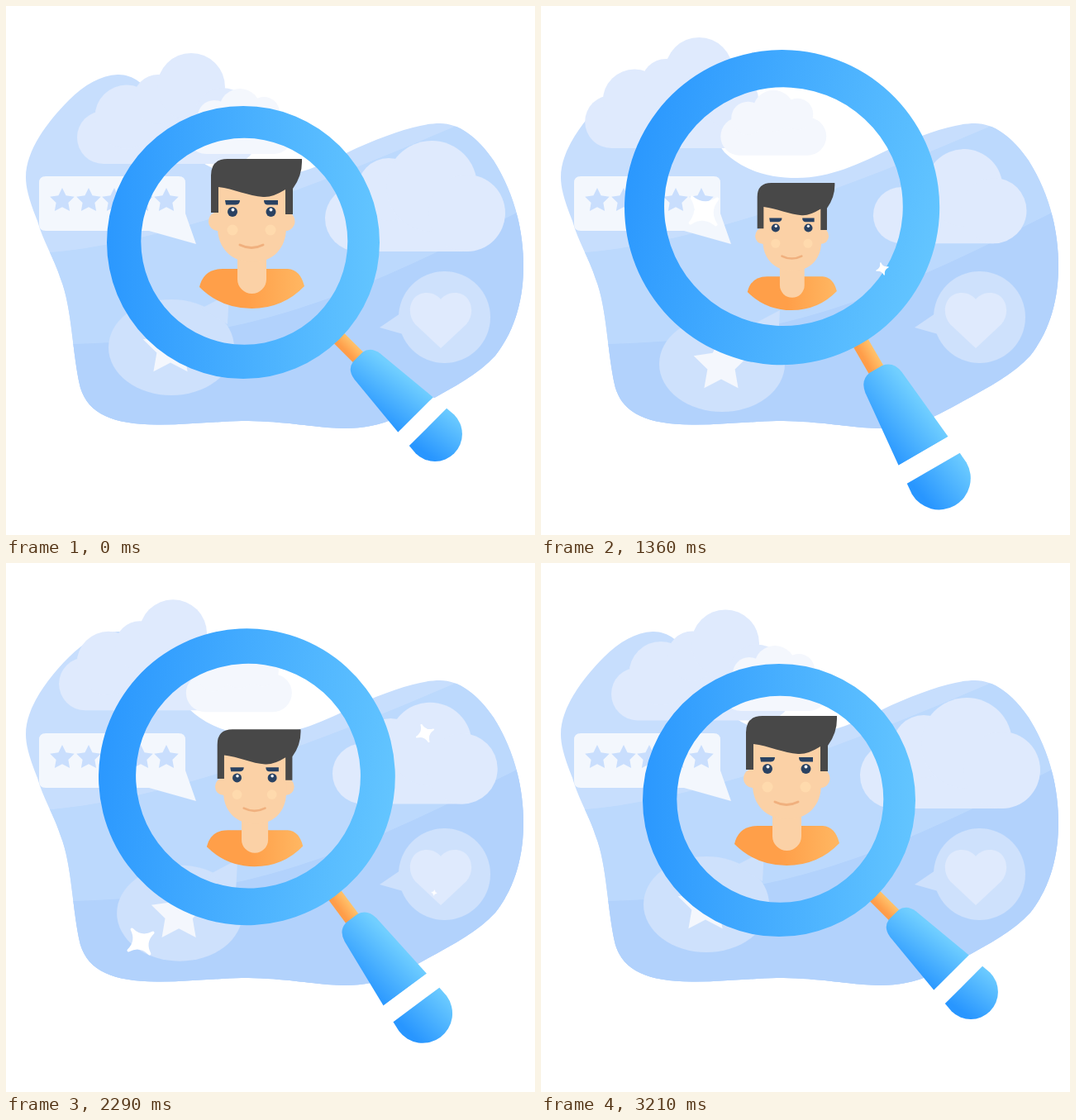
Animation, 640 px wide and 640 px high, one loop 3280 ms. Source, as an HTML page:

```html
<!DOCTYPE html>
<html lang="en">
<head>
<meta charset="utf-8">
<title>Search profile</title>
<style>
  html, body { margin: 0; width: 100%; height: 100%; overflow: hidden; background: #fff; }
  svg { display: block; width: 100vw; height: 100vh; }
</style>
</head>
<body>
<svg viewBox="0 0 640 640">
  <defs>
    <linearGradient id="ringFill"><stop stop-color="#2b98fe"/><stop offset="1" stop-color="#63c5ff"/></linearGradient>
    <linearGradient id="gripFill" gradientUnits="userSpaceOnUse" x1="298" y1="31" x2="288" y2="-31">
      <stop stop-color="#2896ff"/><stop offset="1" stop-color="#71cfff"/>
    </linearGradient>
    <linearGradient id="rodFill" x1="0" y1="1" x2="0" y2="0"><stop offset=".2" stop-color="#ff9d49"/><stop offset="1" stop-color="#ffc36c"/></linearGradient>
    <linearGradient id="shirtFill"><stop offset=".45" stop-color="#ff9f49"/><stop offset="1" stop-color="#ffb762"/></linearGradient>
    <clipPath id="blob">
      <path d="M135 83C172 82 190 130 222 177C245 199 275 208 310 208C350 208 385 191 424 172C465 154 500 142 525 142C548 142 570 158 590 187C612 222 626 265 626 315C626 350 618 390 592 423C570 447 540 462 500 484C470 500 450 511 408 511C370 510 340 502 285 502C250 503 215 507 182 506.5C130 506 100 494 90 462C80 420 80 365 66 330C58 305 45 285 38 260C28 235 24 220 24 207C24 175 50 140 76 114C95 95 115 84 135 83Z"/>
    </clipPath>
  </defs>

  <g clip-path="url(#blob)">
    <path fill="#c7defd" d="M0 0H640V640H0Z"/>
    <path fill="#bcd9fd" d="M0 301L45 299C190 288 370 220 540 147L640 100V640H0Z"/>
    <path fill="#b2d2fc" d="M0 411L78 409C300 404 420 350 620 249L640 239V640H0Z"/>
  </g>

  <g id="leftCloud" fill="#dfeafd">
    <rect x="86" y="127" width="218" height="64" rx="32"/>
    <circle cx="146" cy="134" r="38.5"/>
    <circle cx="184" cy="113" r="30"/>
    <circle cx="224" cy="98" r="41"/>
    <circle cx="262" cy="133" r="34"/>
  </g>

  <g id="smallCloud" fill="#f4f7fd">
    <rect x="217" y="135" width="128" height="46" rx="23"/>
    <circle cx="250" cy="136" r="20"/>
    <circle cx="281" cy="127" r="25"/>
    <circle cx="310" cy="131" r="19"/>
  </g>

  <g id="rightCloud" fill="#dfeafd">
    <rect x="386" y="217" width="210" height="80" rx="40"/>
    <circle cx="463" cy="222" r="38"/>
    <circle cx="515" cy="218" r="55"/>
    <circle cx="557.5" cy="250.5" r="46.5"/>
  </g>

  <g id="rating">
    <path fill="#f3f7fd" d="M48 206H209Q217 206 217 214V251L230 288L173 272H48Q40 272 40 264V214Q40 206 48 206Z"/>
  </g>

  <g fill="#cee1fc">
    <circle cx="530.5" cy="376.5" r="55.5"/>
    <path d="M452 389L477 372L484 398Z"/>
  </g>
  <path fill="#dfeafd" d="M526 414L495 385C483 371 489 347 509 347C518 347 524 352 526 355C528 352 534 347 543 347C563 347 569 371 557 385Z"/>

  <g id="starBubble">
    <g fill="#cee1fc">
      <ellipse cx="200" cy="413" rx="76" ry="58"/>
      <path d="M236 366L270 348L268 385Z"/>
    </g>
  </g>

  <g id="lens">
    <g id="handle">
      <rect x="160" y="-8.8" width="42" height="17.6" fill="url(#rodFill)"/>
      <path fill="url(#gripFill)" d="M196 8V-8Q198 -20 212 -22L295 -30V30L212 22Q198 20 196 8Z"/>
      <path fill="#fff" d="M295 -30L316 -32V32L295 30Z"/>
      <path fill="url(#gripFill)" d="M316 -32L328 -33A33 33 0 0 1 328 33L316 32Z"/>
    </g>
    <path fill="url(#ringFill)" fill-rule="evenodd" d="M-165 0A165 165 0 1 1 165 0A165 165 0 1 1 -165 0ZM-123.7 -1.2A125 125 0 1 0 126.3 -1.2A125 125 0 1 0 -123.7 -1.2Z"/>
  </g>

  <g id="person">
    <path fill="url(#shirtFill)" d="M234 340Q239 318 262 318H341Q356 319 361 339Q335 366 297 366Q260 366 234 340Z"/>
    <g fill="#fbd1a6">
      <rect x="280" y="290" width="35" height="58" rx="17.5"/>
      <circle cx="256.500" cy="260.500" r="11.500"/>
      <circle cx="338" cy="260.500" r="11.500"/>
      <path d="M256 210H339V268C339 292 324 310 298 310C272 310 256 292 256 268Z"/>
    </g>
    <path fill="#484848" d="M248 205Q248 185 268 185H358Q359 205 347 221V252H338V222Q322 232 311 231C294 230 275 221 257 219V250H248Z"/>
    <g fill="#2a4262">
      <path d="M265 235H283Q283 240 278 240.500H266ZM312 235H329V240.500H316Q312 240 312 235Z"/>
      <circle cx="274" cy="249" r="6"/>
      <circle cx="320.500" cy="249" r="6"/>
    </g>
    <g fill="#fff"><circle cx="274.500" cy="246.500" r="1.900"/><circle cx="320.500" cy="246.500" r="1.900"/></g>
    <g fill="#ffdaad"><circle cx="274" cy="271" r="6.500"/><circle cx="320" cy="271" r="6.500"/></g>
    <path fill="none" stroke="#f0b07e" stroke-width="3" stroke-linecap="round" d="M283 289Q297 296 311 289"/>
  </g>

  <g id="sparkles" fill="#fff" stroke="#fff" stroke-width=".17" stroke-linejoin="round"></g>
</svg>
<script>
const LOOP = 3280, TICK = 1000 / 14;
const el = id => document.getElementById(id);
const place = (id, value) => el(id).setAttribute('transform', value);

function add(parent, d, fill) {
  const path = document.createElementNS('http://www.w3.org/2000/svg', 'path');
  path.setAttribute('d', d);
  if (fill) path.setAttribute('fill', fill);
  return el(parent).appendChild(path);
}

function starPath(cx, cy, r) {
  const points = Array.from({ length: 10 }, (_, i) => {
    const angle = (i / 5 - 0.5) * Math.PI, reach = i % 2 ? r / 2 : r;
    return (cx + reach * Math.cos(angle)).toFixed(2) + ' ' + (cy + reach * Math.sin(angle)).toFixed(2);
  });
  return 'M' + points.join('L') + 'Z';
}

// Linear interpolation through [time, value] keys, held at both ends.
function track(t, keys) {
  if (t <= keys[0][0]) return keys[0][1];
  for (let i = 1; i < keys.length; i++) {
    const [t0, a] = keys[i - 1], [t1, b] = keys[i];
    if (t <= t1) return a + (b - a) * (t - t0) / (t1 - t0);
  }
  return keys[keys.length - 1][1];
}

for (const x of [68, 100, 131, 163, 194]) add('rating', starPath(x, 235.5, 15.5), '#c9defd');
add('starBubble', starPath(199, 414, 35), '#f4f7fd');

// x, y, start, peak, end (in ticks), radius
const sparkles = [
  [108, 186, 1, 7.3, 13.8, 28],
  [413, 318, 6, 13.5, 21, 30],
  [197, 248, 11.5, 18, 24.5, 28],
  [239, 95, 19, 25, 31, 22],
  [507, 206, 21.5, 28, 35, 28],
  [163, 458, 24, 30.2, 36.4, 28],
  [518, 399, 30.5, 38, 44, 18]
].map(([x, y, start, peak, end, size]) => ({
  x, y, start, peak, end, size,
  node: add('sparkles', 'M0 -.92Q.12 -.12 .92 0Q.12 .12 0 .92Q-.12 .12 -.92 0Q-.12 -.12 0 -.92Z')
}));

const shrinkAbout = (x, y, s) => `translate(${x} ${y}) scale(${s}) translate(${-x} ${-y})`;

function draw(time) {
  const k = Math.floor((time % LOOP + 5) / TICK);
  const drift = track(k, [[0, 0], [22, 1], [45.6, 0]]);
  const zoom = Math.max(0, Math.min(k - 3, 41 - k, 17.9));
  const slide = track(k, [[0, 0], [14, 1], [25, 1], [40, 0]]);

  place('leftCloud', `translate(${-38 * drift} ${-22 * drift})`);
  place('smallCloud', `translate(${2 - 2 * drift} ${2 * drift - 2})`);
  place('starBubble', `translate(${19 * slide} ${20 * slide})`);

  const shrink = 1 - 0.0093 * zoom;
  place('rightCloud', shrinkAbout(493, 231, shrink));
  place('person', shrinkAbout(340, 380, shrink));

  const x = track(k, [[0, 287], [7, 287.5], [14, 289.5], [23, 293.3], [36, 290.6], [45, 288]]);
  const y = track(k, [[0, 286], [21, 239.2], [23, 239.2], [45, 287]]);
  const turn = 0.93 * zoom;
  place('lens', `translate(${x} ${y}) rotate(${turn}) scale(${1 + 0.00968 * zoom})`);
  place('handle', 'rotate(45)');

  for (const s of sparkles) {
    const r = s.size * track(k, [[s.start, 0], [s.peak, 1], [s.end, 0]]);
    const angle = track(k, [[s.start, 0], [s.peak, 42], [s.end, 84]]);
    s.node.setAttribute('transform', `translate(${s.x} ${s.y}) rotate(${angle}) scale(${r})`);
    s.node.setAttribute('visibility', r > 0 ? 'visible' : 'hidden');
  }
}

const began = performance.now();
function loop() {
  draw(performance.now() - began);
  requestAnimationFrame(loop);
}
loop();
</script>
</body>
</html>
```
